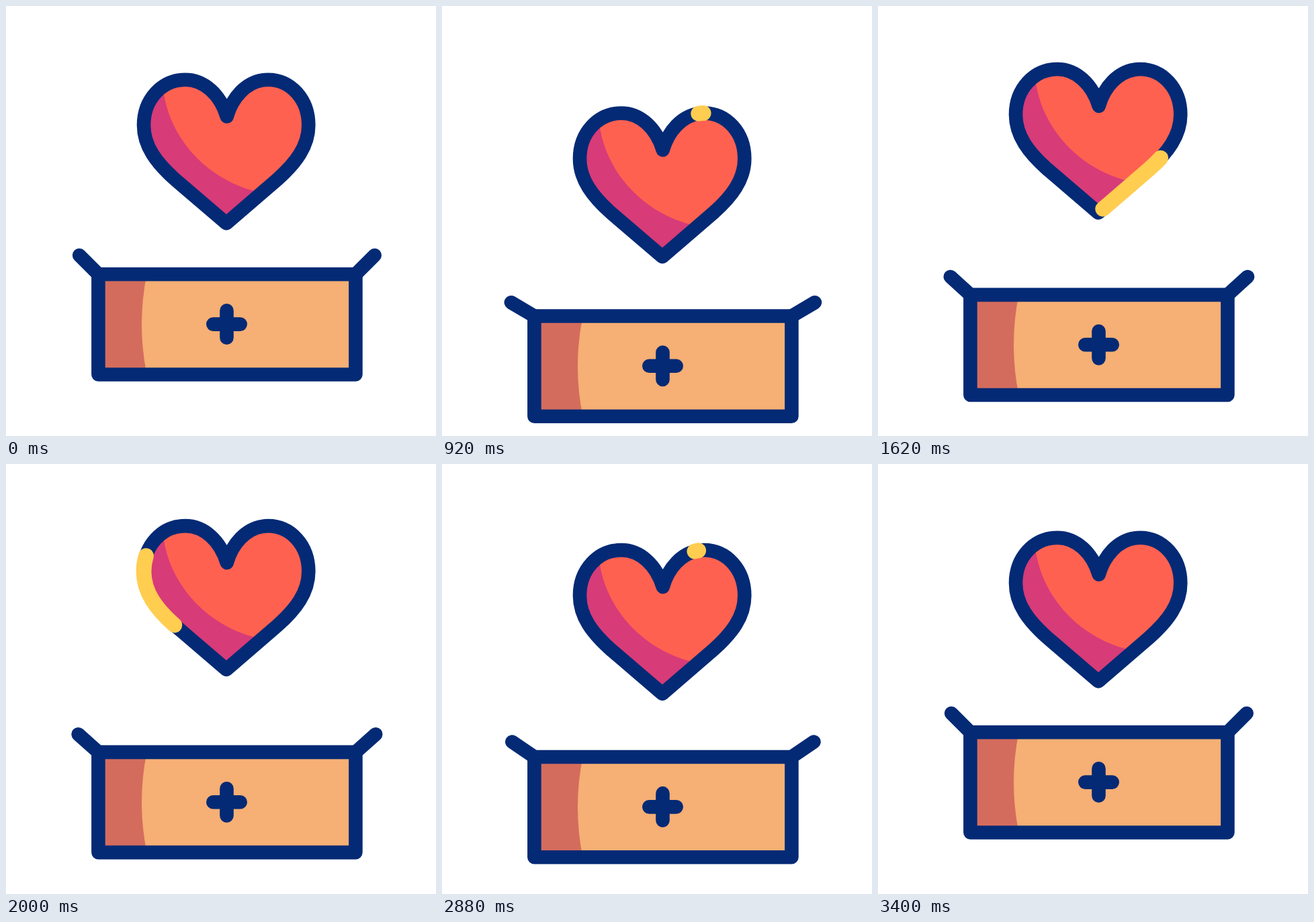
An HTML page for the animation above (3620 ms loop, 640x640 px).

```html
<!DOCTYPE html>
<html lang="en">
<head>
<meta charset="utf-8">
<title>Heart and donation box</title>
<style>
  html, body { margin: 0; width: 100%; height: 100%; overflow: hidden; background: #fff; }
  svg { display: block; width: 100vw; height: 100vh; }
  .line { fill: none; stroke: #042a75; stroke-width: 20.6; stroke-linecap: round; stroke-linejoin: round; }
  #glint { stroke: #ffcd50; stroke-width: 22.8; }
</style>
</head>
<body>
<svg viewBox="0 0 640 640">
  <defs>
    <!-- clockwise, starting where the glint appears -->
    <path id="outline" pathLength="1" d="M381.7 110.4C384.4 109.9 387.2 109.7 390 109.7
      C424 109.7 450.3 139 450.3 177.5C450.3 209 431 234 404 258L328 323.5
      L251.5 258C224.5 234 205 209 205 177.5C205 139 232 109.7 267 109.7
      C295 109.7 319 132 328.7 164.5C337 135.3 357.3 114.3 381.7 110.4Z"/>
    <clipPath id="inside"><use href="#outline"/></clipPath>
  </defs>
  <g id="box">
    <path fill="#f6af74" d="M137.4 399.3H520.4V548.5H137.4Z"/>
    <path fill="#d46c5d" d="M137.4 399.3H209.5Q194.5 474 209.5 548.5H137.4Z"/>
    <path class="line" d="M137.4 399.3H520.4V548.5H137.4Z"/>
    <path class="line" d="M308.3 473.6H348.7M328.5 453.4V493.8"/>
    <path class="line" id="flaps"/>
  </g>
  <g id="heart">
    <use href="#outline" fill="#ff6150"/>
    <path clip-path="url(#inside)" fill="#d73b78"
      d="M230 90L235 131C246 199 299 257.5 372 276L400 340H180V90Z"/>
    <use href="#outline" class="line"/>
    <path id="glint" class="line" pathLength="1"/>
  </g>
</svg>
<script>
const LOOP = 3620, STEP = 20, START = 200, PART = 800;
const boxY = [0, 64, 25.6, 51.2, 0];
const heartY = [0, 51.2, -25.6, 25.6, 0];
const flapAngle = [45, 30, 44, 30, 45];

const $ = id => document.getElementById(id);
const [box, heart, flaps, glint] = ['box', 'heart', 'flaps', 'glint'].map($);
glint.setAttribute('d', $('outline').getAttribute('d'));

const clamp = v => Math.min(1, Math.max(0, v));
const smooth = p => p * p * (3 - 2 * p);

// cubic-bezier(x1, 0, x2, 1)
function ease(x, x1, x2) {
  let lo = 0, hi = 1;
  for (let i = 0; i < 24; i++) {
    const s = (lo + hi) / 2, r = 1 - s;
    if (3 * x1 * s * r * r + 3 * x2 * s * s * r + s ** 3 < x) lo = s; else hi = s;
  }
  return smooth((lo + hi) / 2);
}

function track(values, t) {
  const p = Math.min(3.99999, Math.max(0, (t - START) / PART));
  const i = Math.floor(p);
  return values[i] + (values[i + 1] - values[i]) * smooth(p - i);
}

function trim(t, from) {
  const p = clamp((t - from) / 2000);
  return p === 0 || p === 1 ? p : ease(p, .35, .605);
}

function draw(t) {
  box.setAttribute('transform', `translate(0 ${track(boxY, t)})`);
  heart.setAttribute('transform', `translate(0 ${track(heartY, t)})`);

  const a = track(flapAngle, t) * Math.PI / 180;
  const dx = 40 * Math.cos(a), dy = -40 * Math.sin(a);
  flaps.setAttribute('d', `M137.4 399.3l${-dx} ${dy}M520.4 399.3l${dx} ${dy}`);

  const head = trim(t, 800), tail = trim(t, 1000), len = head - tail;
  glint.style.display = len > 0.0005 ? '' : 'none';
  glint.style.strokeDasharray = `${len} 2`;
  glint.style.strokeDashoffset = -tail;
}

const begin = performance.now();
function tick() {
  const t = (performance.now() - begin) % LOOP;
  draw(Math.floor(t / STEP) * STEP);
  requestAnimationFrame(tick);
}
draw(0);
requestAnimationFrame(tick);
</script>
</body>
</html>
```
